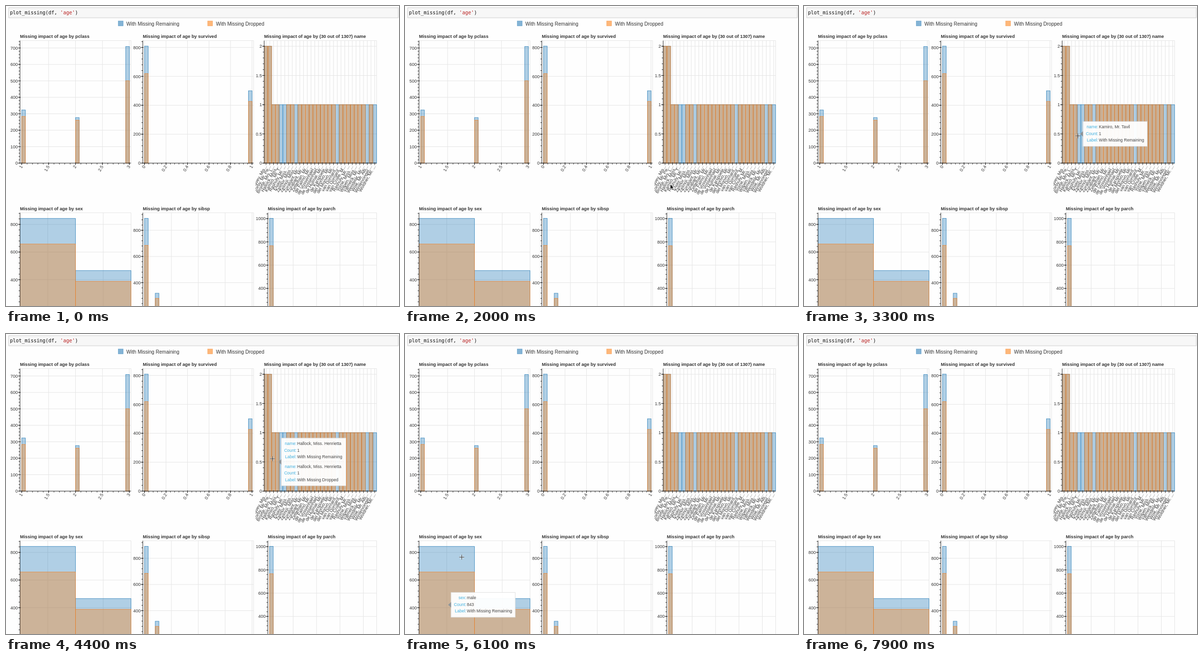
Write an HTML page that moves like this. It is 800 px wide and 611 px high and loops after 8.4 s.

```html
<!DOCTYPE html>
<html lang="en">
<head>
<meta charset="utf-8">
<title>plot_missing</title>
<style>
html, body { margin: 0; width: 100%; height: 100%; overflow: hidden; background: #fefefe; }
svg { display: block; width: 800px; height: 611px; font-family: "Liberation Sans", Arial, sans-serif; }
text { fill: #333; font-size: 9px; white-space: pre; }
.code { font: 10px "DejaVu Sans Mono", monospace; fill: #111; }
.title { font-size: 9.25px; font-weight: bold; }
.legend { font-size: 10.05px; }
.tip { font-size: 8.57px; fill: #444; }
.key { fill: #3fb0e0; }
.end { text-anchor: end; }
.grid { stroke: #e5e5e5; fill: none; }
.axis { stroke: #111; stroke-width: .85; fill: none; }
.blue { fill: #1f77b4; fill-opacity: .35; stroke: #1f77b4; stroke-opacity: .8; stroke-width: .9; }
.orange { fill: #ff7f0e; fill-opacity: .35; stroke: #f07f22; stroke-opacity: .8; stroke-width: .9; }
.icon { fill-opacity: .55; stroke-opacity: .45; }
</style>
</head>
<body>
<svg viewBox="0 0 800 611">
  <defs><clipPath id="edge"><rect x="508" y="315" width="260" height="90"/></clipPath></defs>
  <g id="page"></g>
  <g id="over"></g>
</svg>
<script>
const page = document.getElementById('page');
const over = document.getElementById('over');

const text = (x, y, s, cls = '', more = '') => `<text x="${x}" y="${y}" class="${cls}" ${more}>${s}</text>`;
const rect = (x, y, w, h, cls) => `<rect x="${x}" y="${y}" width="${w}" height="${h}" class="${cls}"/>`;
const path = (d, cls) => `<path d="${d}" class="${cls}"/>`;
const slanted = (x, y, s) => text(0, 3.1, s, 'end', `transform="translate(${x} ${y}) rotate(-60)"`);
const range = (n, f) => Array.from({ length: n }, (_, i) => f(i));

const catWidth = 229 / 30;
const catX = i => 525.5 + catWidth * i;
const blueOnly = [4, 5, 8, 19, 27, 29];
const people = [
  'Dunnavey, Mis', 'Torby, Mr. Pe', 'Brome, Mrs. L', 'Hallock, Miss', 'Kamiro, Mr. T',
  'Rashuly, Mr. ', 'Elvay, Miss. ', 'Zelmor, Miss.', 'Zelmor, Miss.', 'Zorabant, Mr.',
  'Zorabant, Mr.', 'Zettelhan, Mr', 'de Falmo, Mr.', 'de Vossenhael', 'de Vossenhael',
  'de Hulmar, Mr', 'de Karspoele', 'del Monvo, Mr', 'del Monvo, Mr', 'van Dorriard,',
  'van Dorriard,', 'van Crolle, M', 'Rashuly, Mr. ', 'Yorne, Miss. ', 'Wilpen, Miss.',
  'Yalmeck, Mr. ', 'Wendelar, Mr.', 'Wisk, Mr. Alb', 'Wintervongel,', 'Woldner, Mr. '
];

// Bars are [left, width, count remaining, count dropped]; x ticks are [first, gap, labels].
const plots = [
  { title: 'pclass', x: 28.5, w: 226, top: 70.5, base: 320, unit: .335, step: 100, max: 700,
    ticks: [32, 54.75, ['1', '1.5', '2', '2.5', '3']],
    bars: [[32, 7.5, 323, 284], [141.5, 7.5, 277, 261], [243.7, 7.5, 709, 501]] },
  { title: 'survived', x: 278.5, w: 225.5, top: 70.5, base: 320, unit: .2945, step: 200, max: 800,
    ticks: [282, 43.75, ['0', '0.2', '0.4', '0.6', '0.8', '1']],
    bars: [[282, 7.5, 809, 619], [493.5, 7.5, 500, 427]] },
  { title: '(30 out of 1307) name', x: 525.5, w: 229, top: 70.5, base: 320, unit: 119, step: .5, max: 2,
    ticks: [catX(.5), catWidth, people],
    bars: range(30, i => {
      const n = i < 2 ? 2 : 1;
      return [catX(i), catWidth, n, blueOnly.includes(i) ? 0 : n];
    }) },
  { title: 'sex', x: 28.5, w: 226, top: 421, base: 670, unit: .2815, step: 200, max: 800,
    ticks: [85, 113, ['', '']],
    bars: [[28.5, 113, 843, 658], [141.5, 113, 466, 388]] },
  { title: 'sibsp', x: 278.5, w: 225.5, top: 421, base: 670, unit: .2665, step: 200, max: 800,
    ticks: [282, 54.7, ['', '', '', '', '']],
    bars: [[282, 7.5, 891, 685], [303.8, 7.5, 319, 280]] },
  { title: 'parch', x: 533, w: 221.5, top: 421, base: 670, unit: .237, step: 200, max: 1000,
    ticks: [537, 47.6, ['', '', '', '', '']],
    bars: [[536.5, 7.5, 1002, 767]] }
];

function drawPlot(p) {
  const { x, w, top, base } = p;
  const [first, gap, labels] = p.ticks;
  const right = x + w;
  const named = labels === people;
  let grid = `M${x} ${top}H${right}V${base}H${x}Z`;
  let axis = `M${x} ${top}V${base}H${right}`;
  let words = '', slants = '';

  for (let v = 0; v <= p.max; v += p.step) {
    const y = base - v * p.unit;
    grid += `M${x} ${y}H${right}`;
    axis += `M${x - 4} ${y}h5.5`;
    words += text(x - 4.5, y + 3.2, v, 'end');
  }
  const minor = p.step * p.unit / 5;
  for (let y = base; y >= top; y -= minor) axis += `M${x - 2.8} ${y}h2.8`;

  labels.forEach((s, i) => {
    const tx = first + gap * i;
    grid += `M${tx} ${top}V${base}`;
    axis += `M${tx} ${base - 1.5}v5.5`;
    if (s) slants += slanted(tx - .5, 325.3, named ? s + '...' : s);
  });
  if (!named) {
    for (let tx = first; tx <= right; tx += gap / 5) axis += `M${tx} ${base}v2.8`;
  }

  const bar = (k, cls) => p.bars.map(b => {
    const h = b[k] * p.unit;
    return h ? rect(b[0], base - h, b[1], h, cls) : '';
  }).join('');
  return path(grid, 'grid') + bar(2, 'blue') + bar(3, 'orange') + path(axis, 'axis') + words +
    (named ? `<g clip-path="url(#edge)">${slants}</g>` : slants) +
    text(x, top - 5.3, 'Missing impact of age by ' + p.title, 'title');
}

page.innerHTML =
  '<rect x="5.5" y="3.5" width="793" height="20.5" fill="#f7f7f7" stroke="#cfcfcf"/>' +
  text(8, 17, 'plot_missing(df, <tspan fill="#ba2121">\'age\'</tspan>)', 'code') +
  rect(228.5, 30.5, 10, 10, 'blue icon') + text(245, 40, 'With Missing Remaining', 'legend') +
  rect(410.5, 30.5, 10, 10, 'orange icon') + text(427.5, 40, 'With Missing Dropped', 'legend') +
  plots.map(drawPlot).join('');

const kept = 'With Missing Remaining', dropped = 'With Missing Dropped';

function tooltip(x, y, key, name, count, labels, w = 130.5) {
  const h = labels.length > 1 ? 97 : 50.5;
  const left = x + 6, top = y - h / 2;
  let out = `<rect x="${left}" y="${top}" width="${w}" height="${h}" fill="#fff" fill-opacity=".95" stroke="#e0e0e0"/>` +
    `<path d="M${x} ${y}l6 -5.5v11z" fill="#909599"/>`;
  labels.forEach((label, i) => {
    const y0 = top + 14 + i * 46.5;
    if (i) out += `<path d="M${left + 5} ${y0 - 12.5}h${w - 10}" stroke="#e5e5e5" stroke-dasharray="2 2"/>`;
    [[key, name], ['Count', count], ['Label', label]].forEach(([k, v], row) => {
      out += text(left + 31, y0 + row * 13.5, k + ':', 'tip key end') +
        text(left + 32.3, y0 + row * 13.5, v, 'tip');
    });
  });
  return out;
}

const nameTip = (i, name, count, labels, w) =>
  tooltip(catX(i + .5) + 2.2, count > 1 ? 201 : 260.5, 'name', name, count, labels, w);
const hallock = nameTip(3, 'Hallock, Miss. Henrietta', 1, [kept, dropped], 131.5);
const kamiro = nameTip(4, 'Kamiro, Mr. Tavil', 1, [kept]);

// [from, to, content]
const tips = [
  [1000, 1700, tooltip(542.5, 551.5, 'parch', 0, 1002, [kept])],
  [2100, 2700, nameTip(1, 'Torby, Mr. Peter', 2, [dropped, kept])],
  [2700, 3000, nameTip(2, 'Brome, Mrs. Lydia', 1, [kept, dropped])],
  [3000, 3200, hallock],
  [3200, 4400, kamiro],
  [4400, 4500, hallock],
  [5200, 6500, tooltip(87.8, 551.6, 'sex', 'male', 843, [kept])]
];

// [time, x, y]
const track = [
  [100, 557, 18], [500, 556, 230], [900, 546, 445], [1000, 542, 457], [1600, 542, 457],
  [2000, 540, 363], [2200, 537.5, 265.5], [2500, 537.5, 265.5], [3300, 557.5, 264.5],
  [3600, 563, 264], [4300, 563, 264], [4400, 542.5, 254], [4800, 310, 372], [5200, 121, 456],
  [5300, 119.5, 455], [5700, 119.5, 455], [5900, 115.5, 454.5], [6400, 115.5, 454.5],
  [6900, 557, 18], [7200, 557, 18]
];

function pointer(x, y) {
  const inPlot = plots.some(p => x > p.x && x < p.x + p.w && y > p.top && y < p.base);
  const at = s => `<g transform="translate(${x} ${y})" fill="none">${s}</g>`;
  if (inPlot) {
    const d = 'M-5 0H5M0 -5V5';
    return at(`<path d="${d}" stroke="#fff" stroke-opacity=".7" stroke-width="2.4"/><path d="${d}" stroke="#333"/>`);
  }
  if (y < 25) return at('<path d="M-2.5 -6Q0 -6 0 -4Q0 -6 2.5 -6M0 -4V4M-2.5 6Q0 6 0 4Q0 6 2.5 6M-1.5 2H1.5" stroke="#222"/>');
  return at('<path d="M0 0V10.2L2.4 8L4.2 12L6 11.2L4.3 7.3H7.4Z" fill="#000" stroke="#fff" stroke-width=".8"/>');
}

function overlay(t) {
  const tip = tips.find(([from, to]) => t >= from && t < to);
  const next = track.findIndex(k => k[0] > t);
  let out = tip ? tip[2] : '';
  if (next > 0) {
    const [t0, x0, y0] = track[next - 1], [t1, x1, y1] = track[next];
    const f = (t - t0) / (t1 - t0);
    out += pointer(x0 + (x1 - x0) * f, y0 + (y1 - y0) * f);
  }
  return out;
}

const loop = 8400, tick = 100;
const start = performance.now();
let shown = -1;

function frame() {
  const elapsed = Math.max(0, performance.now() - start) % loop;
  const t = Math.floor(elapsed / tick) * tick;
  if (t !== shown) over.innerHTML = overlay(shown = t);
  requestAnimationFrame(frame);
}
frame();
</script>
</body>
</html>
```
